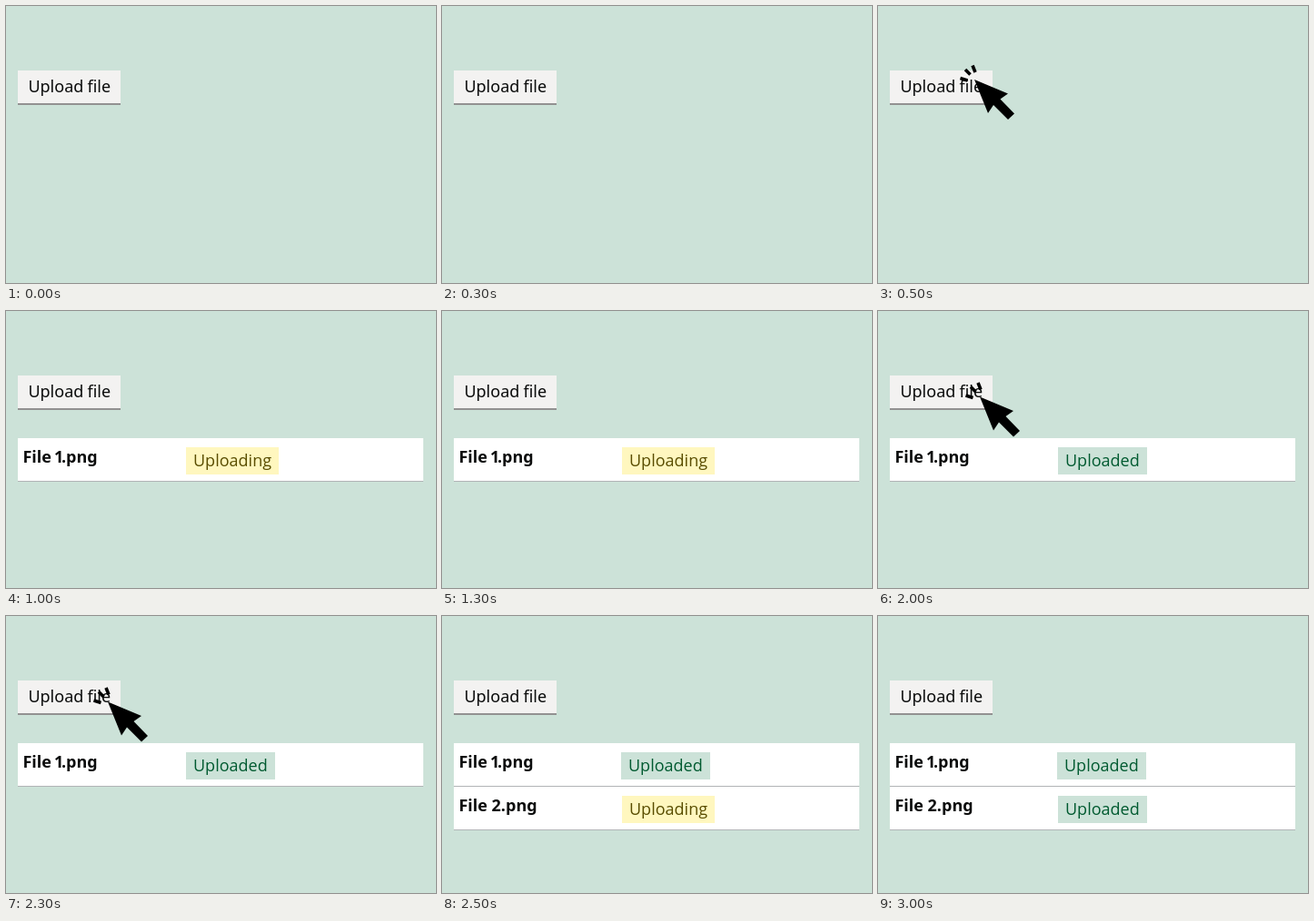
Recreate the animation shown at these times as an HTML page. Size 473x305 px, loop 3500 ms.

```html
<!DOCTYPE html>
<html lang="en">
<head>
<meta charset="utf-8">
<title>File upload</title>
<style>
  html, body { margin: 0; width: 100%; height: 100%; overflow: hidden; background: #cce2d8; }
  svg { display: block; width: 473px; height: 305px; }
  text { font: 18px "Noto Sans", "Open Sans", sans-serif; fill: #0b0c0c; }
  .name { font-weight: 700; }
  .tag text { font-family: "Open Sans", "Noto Sans", sans-serif; }
  .busy rect { fill: #fff7bf; }
  .busy text { fill: #594d00; }
  .done rect { fill: #cce2d8; }
  .done text { fill: #005a30; }
  [hidden] { display: none; }
</style>
</head>
<body>
<svg viewBox="0 0 473 305">
  <rect x="13" y="71" width="113" height="36" fill="#f3f2f1"/>
  <rect x="13" y="107" width="113" height="2" fill="#929191"/>
  <text x="24.4" y="95" word-spacing="-.5">Upload file</text>

  <g id="row1">
    <rect x="13" y="140" width="446" height="47" fill="#fff"/>
    <rect x="13" y="187" width="446" height="1" fill="#b1b4b6"/>
    <text class="name" x="18.4" y="167">File <tspan dx="-1.5">1</tspan><tspan dx="-2.5">.png</tspan></text>
    <g class="tag"><rect x="198" y="150" height="30"/><text x="206" y="171"></text></g>
  </g>
  <g id="row2" transform="translate(0 48)">
    <rect x="13" y="140" width="446" height="47" fill="#fff"/>
    <rect x="13" y="187" width="446" height="1" fill="#b1b4b6"/>
    <text class="name" x="18.4" y="167">File 2.png</text>
    <g class="tag"><rect x="198" y="150" height="30"/><text x="206" y="171"></text></g>
  </g>

  <g id="cursor">
    <path d="M0 0 37 15.5 28.5 21.5 44 37.5 37 44 21 28 15 37Z"/>
    <path d="M-15.5 -1.5 -7.5 1M-10 -11 -4.5 -5.5M-2 -15.5 1 -8" stroke="#000" stroke-width="3.6"/>
  </g>
</svg>
<script>
const STEP = 500, STEPS = 7;
const $ = id => document.getElementById(id);

function show(id, visible) {
  $(id).toggleAttribute("hidden", !visible);
}

function setTag(rowId, done, x = 0) {
  const tag = $(rowId).querySelector(".tag");
  tag.setAttribute("class", `tag ${done ? "done" : "busy"}`);
  tag.setAttribute("transform", `translate(${x} 0)`);
  tag.querySelector("rect").setAttribute("width", done ? 98 : 102);
  tag.querySelector("text").textContent = done ? "Uploaded" : "Uploading";
}

function draw(step) {
  show("row1", step >= 2);
  show("row2", step >= 5);
  setTag("row1", step >= 3, step >= 5 ? -1 : 0);
  setTag("row2", step >= 6);
  show("cursor", step === 1 || step === 4);
  $("cursor").setAttribute("transform", step === 4 ? "translate(112 94.5)" : "translate(106 81)");
}

let current = -1;
function tick() {
  const step = Math.floor(performance.now() / STEP) % STEPS;
  if (step !== current) draw(current = step);
  requestAnimationFrame(tick);
}
tick();
</script>
</body>
</html>
```
